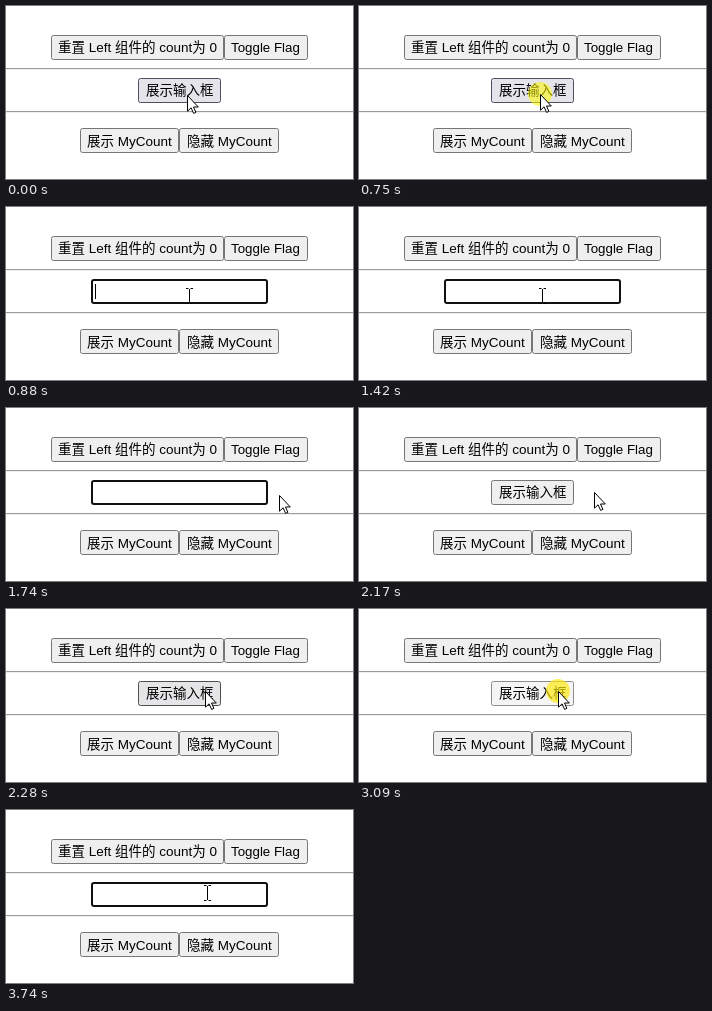
Recreate the animation shown at these times as an HTML page. Size 347 by 173 pixels, loop 4200 ms.

```html
<!DOCTYPE html>
<html lang="zh-CN">
<head>
<meta charset="utf-8">
<style>
html, body { margin: 0; width: 100%; height: 100%; overflow: hidden; background: #fff; }
svg { display: block; width: 100%; height: 100%; }
text { font: 13.5px "Liberation Sans", "Noto Sans CJK SC", "Noto Sans CJK", sans-serif; fill: #000; white-space: pre; }
.btn rect { fill: #efefef; stroke: #767676; }
#latin { font-size: 13.333px; }
</style>
</head>
<body>
<svg viewBox="0 0 347 173">
  <rect width="347" height="173" fill="#fff"/>
  <g fill="#9a9a9a"><rect y="62" width="347" height="1"/><rect y="105" width="347" height="1"/></g>
  <g fill="#eee"><rect y="63" width="347" height="1"/><rect y="106" width="347" height="1"/></g>
  <g class="btn">
    <rect x="45.5" y="29.5" width="172" height="24" rx="2"/>
    <text x="52" y="46">重置 Left 组件的 count为 0</text>
    <rect x="218.5" y="29.5" width="83" height="24" rx="2"/>
    <text id="latin" x="225" y="46">Toggle Flag</text>
    <rect x="74.5" y="122.5" width="98" height="24" rx="2"/>
    <text x="81" y="140">展示 MyCount</text>
    <rect x="173.5" y="122.5" width="99" height="24" rx="2"/>
    <text x="181" y="140">隐藏 MyCount</text>
  </g>
  <g id="show" class="btn">
    <rect id="face" x="132.5" y="72.5" width="82" height="24" rx="2"/>
    <text x="140" y="89">展示输入框</text>
  </g>
  <g id="field">
    <rect x="86" y="73" width="175" height="23" rx="2" fill="#fff" stroke="#101010" stroke-width="2"/>
    <rect id="caret" x="89" y="77" width="1" height="15"/>
  </g>
  <circle id="halo" r="12"/>
  <path id="arrow" d="M.5 .5V16.2L4.1 12.8L6.6 18.4L8.9 17.4L6.5 12H11.3Z" fill="#fff" stroke="#000"/>
  <path id="beam" d="M-1 -6.5H1.5M3.5 -6.5H6M2.5 -6V8M-1 8.5H1.5M3.5 8.5H6" fill="none" stroke="#000"/>
</svg>
<script>
const LOOP = 4200;
const $ = id => document.getElementById(id);
const [show, face, field, caret, halo, arrow, beam] =
  ["show", "face", "field", "caret", "halo", "arrow", "beam"].map($);

const within = (t, a, b) => t >= a && t < b;
const visible = (el, on) => el.setAttribute("visibility", on ? "visible" : "hidden");
const place = (el, [x, y]) => el.setAttribute("transform", `translate(${x} ${y})`);

function glide(t, start, end, from, to) {
  const p = Math.min(1, Math.max(0, (t - start) / (end - start)));
  const e = p * p * (3 - 2 * p);
  return from.map((v, i) => Math.round(v + (to[i] - v) * e));
}

function pointer(t) {
  if (t < 340) return [181, 89];
  if (t < 2040) return glide(t, 1510, 1850, [181, 88], [302, 87]);
  return glide(t, 2020, 2270, [302, 87], [199, 82]);
}

// Fill and border of the middle button: pressed, hovered or idle.
function buttonLook(t, x) {
  if (within(t, 800, 880) || within(t, 3090, 3250)) return ["#f5f5f5", "#8d8d8d"];
  if (t < 800) return ["#e4e4ea", "#4f4f62"];
  return x < 215 ? ["#e5e5e7", "#4f4f4f"] : ["#efefef", "#767676"];
}

function haloFill(t) {
  if (within(t, 750, 800)) return "rgba(255,250,0,.56)";
  if (within(t, 800, 880) || within(t, 3090, 3250)) return "rgba(255,232,0,.65)";
  if (within(t, 1870, 2040)) return "rgba(255,255,0,.5)";
  return "none";
}

function draw(t) {
  const pos = pointer(t);
  const open = within(t, 880, 1870) || t >= 3250;
  const text = open && pos[0] < 262;
  const [fill, edge] = buttonLook(t, pos[0]);

  visible(show, !open);
  visible(field, open);
  visible(caret, within(t, 880, 1420) || within(t, 3250, 3740));
  face.style.fill = fill;
  face.style.stroke = edge;
  halo.style.fill = haloFill(t);
  for (const el of [halo, arrow, beam]) place(el, pos);
  visible(arrow, !text);
  visible(beam, text);
}

const began = performance.now();
function tick() {
  draw((performance.now() - began) % LOOP);
  requestAnimationFrame(tick);
}
tick();
</script>
</body>
</html>
```
